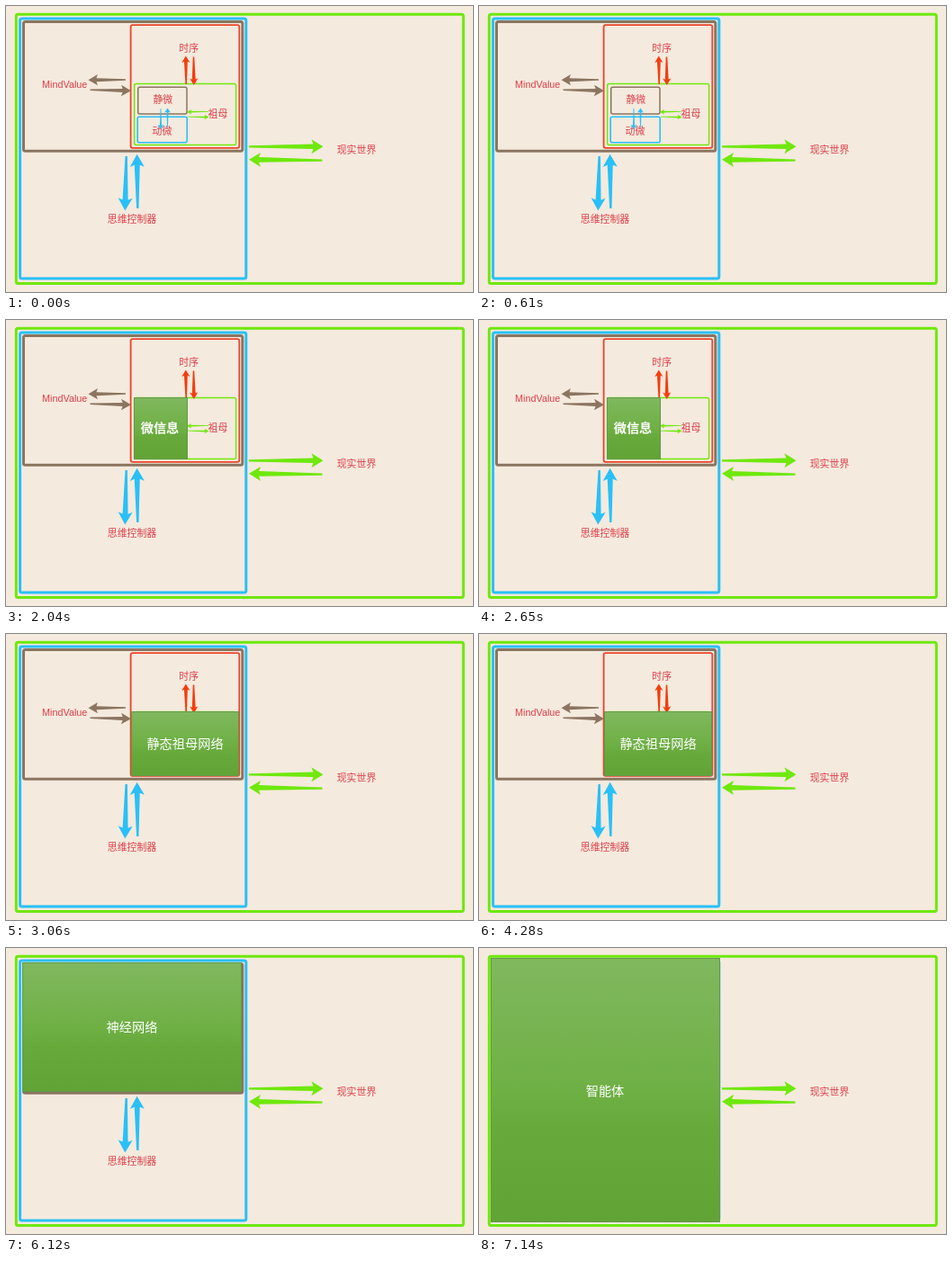
Recreate the animation shown at these times as an HTML page with a canvas. Size 519x318 px, loop 8000 ms.

```html
<!DOCTYPE html>
<html lang="zh-CN">
<head>
<meta charset="utf-8">
<title>Nested systems</title>
<style>
html, body { margin: 0; width: 100%; height: 100%; overflow: hidden; background: #f5eade; }
canvas { display: block; width: 519px; height: 318px; }
</style>
</head>
<body>
<canvas id="stage"></canvas>
<script>
const W = 519, H = 318, LOOP = 8000;
const LIME = '#6fe80c', SKY = '#29c0f7', BROWN = '#8b7560', RED = '#e9452a', ORANGE = '#f53d0c', LABEL = '#dd3c46';
const CJK = '"Noto Sans CJK SC", "Noto Sans CJK", sans-serif';

const canvas = document.getElementById('stage');
const ctx = canvas.getContext('2d');
const ratio = window.devicePixelRatio || 1;
canvas.width = Math.round(W * ratio);
canvas.height = Math.round(H * ratio);
ctx.scale(ratio, ratio);

function frame(left, top, right, bottom, color, width, radius = 2) {
  ctx.strokeStyle = color;
  ctx.lineWidth = width;
  ctx.beginPath();
  ctx.roundRect(left, top, right - left, bottom - top, radius);
  ctx.stroke();
}

// Tapered shaft that widens toward a barbed head.
function arrow(x1, y1, x2, y2, color, head, half, shaft) {
  const length = Math.hypot(x2 - x1, y2 - y1);
  const neck = length - head * 0.85;
  ctx.save();
  ctx.translate(x1, y1);
  ctx.rotate(Math.atan2(y2 - y1, x2 - x1));
  ctx.fillStyle = color;
  ctx.beginPath();
  ctx.moveTo(0, -shaft * 0.4);
  ctx.lineTo(neck, -shaft);
  ctx.lineTo(length - head, -half);
  ctx.lineTo(length, 0);
  ctx.lineTo(length - head, half);
  ctx.lineTo(neck, shaft);
  ctx.lineTo(0, shaft * 0.4);
  ctx.closePath();
  ctx.fill();
  ctx.restore();
}

function label(text, x, y, size = 10.9, color = LABEL, weight = 400, family = CJK) {
  ctx.font = `${weight} ${size}px ${family}`;
  ctx.fillStyle = color;
  ctx.textAlign = 'center';
  ctx.textBaseline = 'alphabetic';
  ctx.fillText(text, x, y + size * 0.38);
}

function diagram() {
  ctx.fillStyle = '#f5eade';
  ctx.fillRect(0, 0, W, H);

  frame(11.3, 9.3, 508.3, 308.6, LIME, 3);
  frame(15.6, 14, 266.8, 303, SKY, 3);
  frame(19.5, 17.6, 262.8, 161.2, BROWN, 3);
  frame(138.6, 21.2, 259.3, 157.8, RED, 1.8);
  frame(142.6, 86.6, 255.6, 154.4, LIME, 1.5);
  frame(146.7, 90.2, 201, 120, BROWN, 1.5);
  frame(146.2, 123.2, 201.2, 151.8, SKY, 1.6);

  label('MindValue', 65.2, 87, 10.8, LABEL, 400, '"Liberation Sans", sans-serif');
  label('时序', 203.2, 46.8);
  label('静微', 174.3, 104);
  label('动微', 173.5, 138.5);
  label('祖母', 235.5, 119.8);
  label('现实世界', 389.5, 160.3);
  label('思维控制器', 140, 237);

  arrow(270, 156.3, 352.5, 156.3, LIME, 13, 8, 2.8);
  arrow(351.5, 171.6, 270, 170.8, LIME, 13, 8, 2.8);
  arrow(133.7, 167, 132.3, 227.5, SKY, 14, 8, 3);
  arrow(146.3, 225, 145.6, 164.8, SKY, 14, 8, 3);
  arrow(133, 82, 91.5, 82.2, BROWN, 10.5, 6.2, 2);
  arrow(93.5, 93.3, 139, 94.3, BROWN, 11, 6.2, 2);
  arrow(200.2, 87, 199.8, 55.5, ORANGE, 7.5, 4.6, 1.9);
  arrow(208.5, 56.5, 208.8, 88, ORANGE, 7.5, 4.6, 1.9);
  arrow(225, 117.3, 201, 117.8, LIME, 5, 2.7, 0.9);
  arrow(202, 123.2, 225.5, 123.6, LIME, 5, 2.7, 0.9);
  arrow(172, 114, 172, 137, SKY, 5, 3.4, 1);
  arrow(179.5, 135, 179.5, 113.5, SKY, 5, 3.4, 1);
}

function panel({ box: [left, top, right, bottom], text, at, weight = 500 }) {
  const shade = ctx.createLinearGradient(0, top, 0, bottom);
  shade.addColorStop(0, '#80b85f');
  shade.addColorStop(0.5, '#6fb045');
  shade.addColorStop(0.65, '#67a93b');
  shade.addColorStop(1, '#62a336');
  ctx.fillStyle = shade;
  ctx.fillRect(left, top, right - left, bottom - top);
  ctx.strokeStyle = '#62994a';
  ctx.lineWidth = 1;
  ctx.strokeRect(left + 0.5, top + 0.5, right - left - 1, bottom - top - 1);
  label(text, at[0], at[1], 14.2, '#fff', weight);
}

const steps = [
  { start: 0 },
  { start: 1020, box: [145, 90, 202, 120], text: '静微', at: [172.6, 105], weight: 700 },
  { start: 2040, box: [142, 86, 202, 155], text: '微信息', at: [171, 120], weight: 700 },
  { start: 3060, box: [139, 86, 259, 158], text: '静态祖母网络', at: [199, 121.3] },
  { start: 5100, box: [137, 20, 261, 160], text: '数据网络', at: [198.3, 89.5], weight: 700 },
  { start: 6120, box: [18, 16, 262, 160], text: '神经网络', at: [140, 87.6] },
  { start: 7140, box: [13, 11, 268, 305], text: '智能体', at: [140, 158.2] }
];

function draw(now) {
  const time = now % LOOP;
  const step = steps.findLast(s => s.start <= time) || steps[0];
  diagram();
  if (step.box) panel(step);
  requestAnimationFrame(draw);
}
requestAnimationFrame(draw);
</script>
</body>
</html>
```
